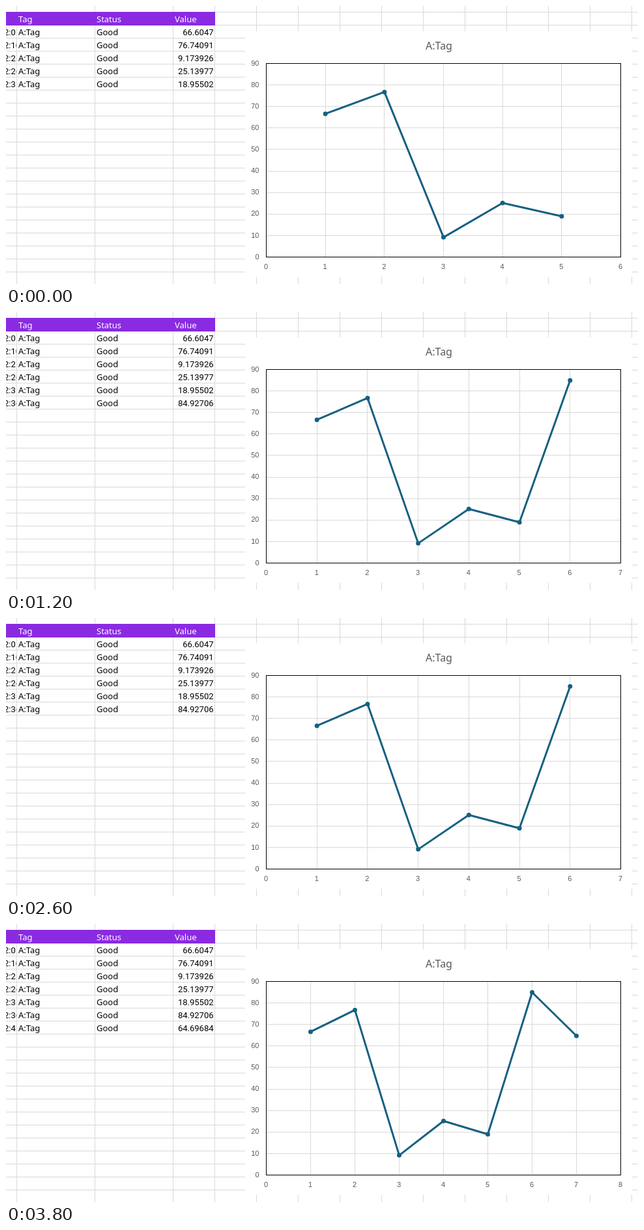
Recreate the animation shown at these times as an HTML page. Size 970 by 428 pixels, loop 3.9 s.

```html
<!DOCTYPE html>
<html lang="en">
<head>
<meta charset="utf-8">
<title>Live tag chart</title>
<style>
  html, body { margin: 0; width: 100%; height: 100%; overflow: hidden; background: #fff; }
  svg { display: block; }
  .cell { font: 13px "Noto Sans", sans-serif; fill: #000; }
  .num { font: 13px Roboto, sans-serif; fill: #000; text-anchor: end; }
  .head { fill: #fff; }
  .axis { font: 11px "Liberation Sans", Arial, sans-serif; fill: #595959; }
  .title { font: 16px "Noto Sans", sans-serif; fill: #595959; text-anchor: middle; }
  .grid { stroke: #d9d9d9; fill: none; shape-rendering: crispEdges; }
</style>
</head>
<body>
<svg id="stage" width="970" height="428" viewBox="0 0 970 428">
  <clipPath id="timeCol"><rect width="16" height="428"/></clipPath>
</svg>
<script>
const LOOP = 3900, MOVE = 500;
const UPDATES = [300, 3300];
const VALUES = [66.6047, 76.74091, 9.173926, 25.13977, 18.95502, 84.92706, 64.69684];
const TIMES = ["2:0", "2:10", "2:2", "2:26", "2:3", "2:36", "2:4"];
const PLOT = { x: 399.5, y: 88.5, w: 544, h: 298 };
const stage = document.getElementById("stage");

function add(tag, attrs, parent = stage, text = "") {
  const el = document.createElementNS("http://www.w3.org/2000/svg", tag);
  for (const k in attrs) el.setAttribute(k, attrs[k]);
  el.textContent = text;
  return parent.appendChild(el);
}
const label = (cls, x, y, text, parent) => add("text", { class: cls, x, y }, parent, text);
const yOf = v => PLOT.y + PLOT.h * (1 - v / 90);

// Sheet
let lines = "";
for (let y = 9.5; y < 428; y += 20) lines += `M0 ${y}H970`;
for (const x of [16.5, 136.5, 256.5]) lines += `M${x} 0V428`;
for (let x = 320.5; x < 970; x += 64) lines += `M${x} 0V428`;
add("path", { class: "grid", d: lines });
add("rect", { x: 0, y: 9, width: 321, height: 21, fill: "#8a2be2" });
label("cell head", 19, 25, "Tag");
label("cell head", 139, 25, "Status");
label("cell head", 259, 25, "Value");

const rows = VALUES.map((v, i) => {
  const row = add("g", {}), y = 45 + 20 * i;
  const time = add("g", { "clip-path": "url(#timeCol)" }, row);
  label("num", -3, y, TIMES[i], time).style.textAnchor = "start";
  label("cell", 19, y, "A:Tag", row);
  label("cell", 139, y, "Good", row);
  label("num", 318.5, y, v, row);
  return row;
});

// Chart
add("rect", { x: 367, y: 39, width: 594, height: 378, fill: "#fff" });
label("title", 664.5, 67, "A:Tag");
let levels = "";
for (let v = 0; v <= 90; v += 10) {
  levels += `M${PLOT.x} ${Math.floor(yOf(v)) + 0.5}h${PLOT.w}`;
  label("axis", 388.5, yOf(v) + 3.2, v).style.textAnchor = "end";
}
add("path", { class: "grid", d: levels });
const columns = add("path", { class: "grid" });
add("rect", {
  x: PLOT.x, y: PLOT.y, width: PLOT.w, height: PLOT.h,
  fill: "none", stroke: "#000", "shape-rendering": "crispEdges"
});
const ticks = Array.from({ length: 9 }, (_, i) => {
  const tick = label("axis", 0, 405, i);
  tick.style.textAnchor = "middle";
  return tick;
});
const curve = add("path", {
  fill: "none", stroke: "#156082", "stroke-width": 3, "stroke-linejoin": "round", "stroke-linecap": "round"
});
const dots = VALUES.map(() => add("circle", { r: 3.5, fill: "#156082" }));

const ease = p => p * p * (3 - 2 * p);

function draw(t) {
  let count = 5, size = 5;
  for (const start of UPDATES) {
    if (t < start) break;
    count++;
    size += ease(Math.min(1, (t - start) / MOVE));
  }
  const max = size + 1, grow = size - (count - 1);
  const xOf = k => PLOT.x + PLOT.w * k / max;

  rows.forEach((row, i) => row.style.display = i < count ? "" : "none");

  let cols = "";
  for (let k = 1; k < max; k++) cols += `M${Math.floor(xOf(k)) + 0.5} ${PLOT.y}v${PLOT.h}`;
  columns.setAttribute("d", cols);

  ticks.forEach((tick, k) => {
    tick.setAttribute("x", xOf(Math.min(k, max)) - 0.5);
    tick.style.opacity = k <= count ? 1 : k === count + 1 ? Math.max(0, grow * 2 - 1) : 0;
  });

  // The newest point travels out from the one before it.
  let d = "";
  dots.forEach((dot, i) => {
    dot.style.display = i < count ? "" : "none";
    if (i >= count) return;
    const p = i === count - 1 ? grow : 1;
    const prev = VALUES[Math.max(0, i - 1)];
    const x = xOf(i + p), y = yOf(prev + (VALUES[i] - prev) * p);
    dot.setAttribute("cx", x);
    dot.setAttribute("cy", y);
    d += `${i ? "L" : "M"}${x} ${y}`;
  });
  curve.setAttribute("d", d);
}

const begin = performance.now();
function tick() {
  draw((performance.now() - begin) % LOOP);
  requestAnimationFrame(tick);
}
tick();
</script>
</body>
</html>
```
